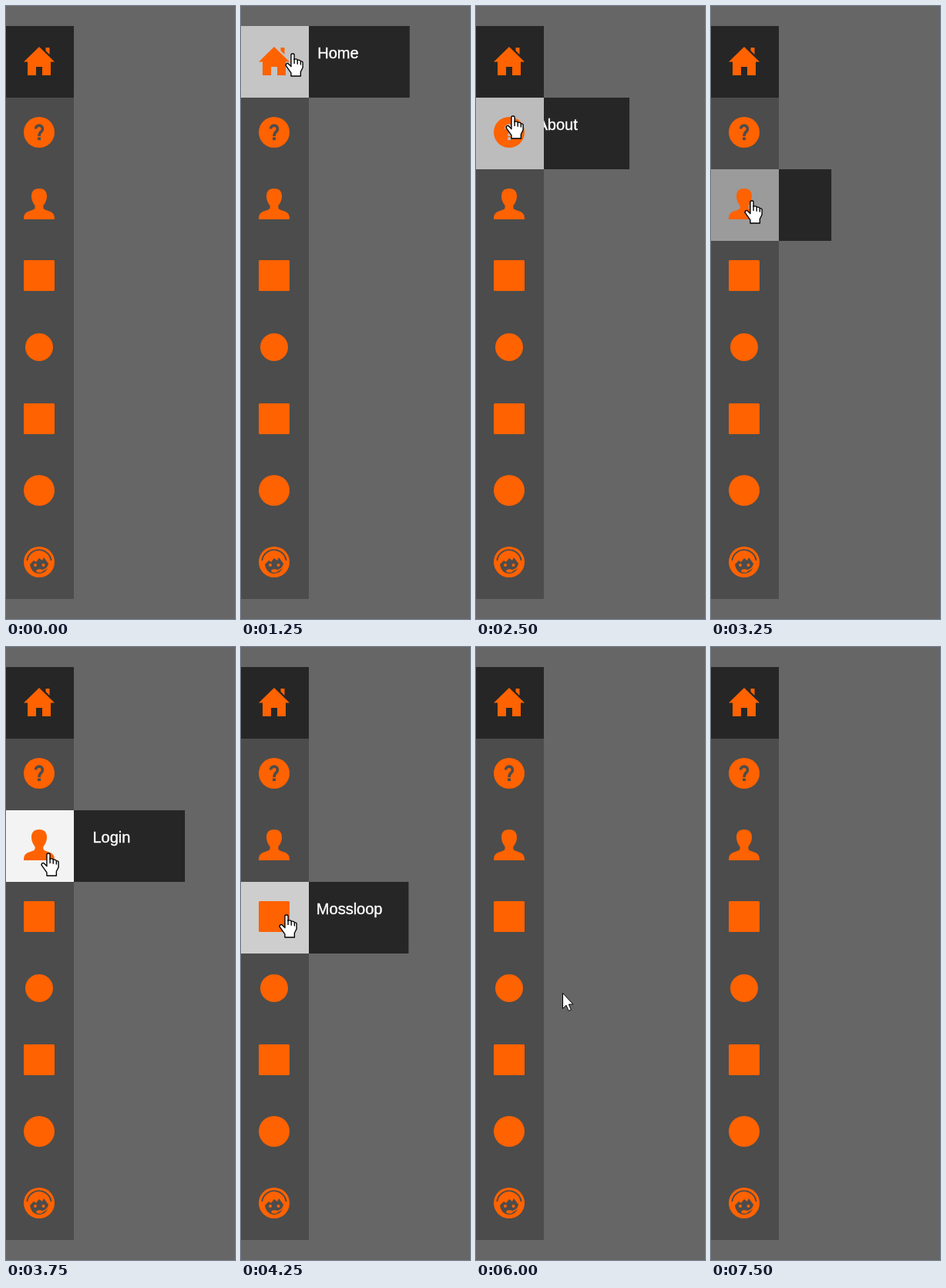
Animation, 297 px wide and 796 px high, one loop 8250 ms. Source, as an HTML page with a canvas:

```html
<!DOCTYPE html>
<html lang="en">
<head>
<meta charset="utf-8">
<title>Sliding side menu</title>
<style>
  html, body { margin: 0; width: 100%; height: 100%; overflow: hidden; background: #666; }
  canvas { display: block; }
</style>
</head>
<body>
<canvas id="stage" width="297" height="796"></canvas>
<script>
const ctx = document.getElementById('stage').getContext('2d');
const LOOP = 8250, STEP = 250;
const ORANGE = '#ff6200', DARK = '#262626';
const COLUMN = 88, PANEL = 144, ROW = 93, TOP = 26, SLIDE = 500, FADE = 240;

// Hovered rows: label, start and end of the hover in ms
const hovers = [
  { row: 0, label: 'Home', from: 932, to: 2250 },
  { row: 1, label: 'About', from: 2250, to: 3250, lead: -15 },
  { row: 2, label: 'Login', from: 3110, to: 4000 },
  { row: 3, label: 'Mossloop', from: 3940, to: 5000 },
  { row: 4, label: 'Murlite', from: 4790, to: 6000 }
];

// Pointer stops: time, x, y of the tip
const stops = [
  [750, 227, 79], [1000, 67, 62], [1500, 67, 55], [2000, 56, 73],
  [2250, 49, 135], [2500, 48, 143], [2750, 48, 150], [3000, 49, 211],
  [3250, 53, 253], [3750, 55, 268], [4000, 58, 325], [4250, 59, 348],
  [4750, 72, 403], [5000, 68.5, 448], [6000, 112, 449]
];

const shapes = {
  house: new Path2D('M20 2L40 21.500H35V39H24V28H16V39H5V21.500H0ZM28.500 3H33.500V12L28.500 7Z'),
  person: new Path2D('M20 0C27 0 30 4 30 10C30 16 27 20 25.5 22C25 26 26 27 29 28' +
    'C37 30.500 40 32 40 40H0C0 32 3 30.500 11 28C14 27 15 26 14.5 22C13 20 10 16 10 10C10 4 13 0 20 0Z'),
  face: new Path2D('M8 23L13 18L16 20L20 15L24 18L26 14L29 18L32 22C32 30 27 35 20 35S9 30 8 23Z'),
  hand: new Path2D('M5.500 13V1.500Q5.500 .5 6.500 .5H7.500Q8.500 .5 8.500 1.500V6Q8.500 5.500 10 5.500' +
    'Q11.500 5.500 11.500 6.500Q14 6 14.500 7.500Q16.500 7.500 16.500 9V13.500L14.500 17.500V21.500' +
    'H5.500V18.500L.5 11.500Q.5 9.500 2.500 9.500L5.500 12.500'),
  knuckles: new Path2D('M8.500 5V10M11.500 6.500V10.500M14.500 7.500V11'),
  arrow: new Path2D('M.5 .5V20.500L5 16.200L8.200 23.500L11.400 22L8.300 15H14Z')
};

// CSS "ease" timing, cubic-bezier(.25, .1, .25, 1)
function ease(p) {
  if (p <= 0) return 0;
  if (p >= 1) return 1;
  const curve = (u, a, b) => 3 * u * (1 - u) ** 2 * a + 3 * u * u * (1 - u) * b + u ** 3;
  let lo = 0, hi = 1;
  for (let i = 0; i < 24; i++) {
    const mid = (lo + hi) / 2;
    if (curve(mid, 0.25, 0.25) < p) lo = mid; else hi = mid;
  }
  return curve(lo, 0.1, 1);
}

function rect(x, y, w, h, color) {
  ctx.fillStyle = color;
  ctx.fillRect(x, y, w, h);
}

function disc(x, y, rx, color, ry = rx) {
  ctx.fillStyle = color;
  ctx.beginPath();
  ctx.ellipse(x, y, rx, ry, 0, 0, Math.PI * 2);
  ctx.fill();
}

function arc(x, y, r, from, to, width, color) {
  ctx.strokeStyle = color;
  ctx.lineWidth = width;
  ctx.beginPath();
  ctx.arc(x, y, r, from * Math.PI, to * Math.PI);
  ctx.stroke();
}

function fillShape(path, color = ORANGE) {
  ctx.fillStyle = color;
  ctx.fill(path);
}

function square() {
  ctx.fillStyle = ORANGE;
  ctx.beginPath();
  ctx.roundRect(0, 0, 40, 40, 1.5);
  ctx.fill();
}

function help(back) {
  disc(20, 20, 20, ORANGE);
  ctx.strokeStyle = back;
  ctx.lineWidth = 3.6;
  ctx.beginPath();
  ctx.arc(20, 15.5, 4.4, Math.PI, Math.PI * 2.2);
  ctx.quadraticCurveTo(20, 21, 20, 25);
  ctx.stroke();
  rect(18, 26.5, 4, 3.6, back);
}

function support(back) {
  disc(20, 20, 20, ORANGE);
  arc(20, 20, 15.8, 1.04, 1.96, 1.8, back);
  fillShape(shapes.face, back);
  disc(15, 24, 2, ORANGE);
  disc(25.5, 24, 2, ORANGE);
  disc(20.5, 31.5, 4.2, ORANGE, 2.2);
  arc(21, 19, 12.5, 0.1, 0.45, 1.6, ORANGE);
}

const icons = [
  () => fillShape(shapes.house),
  help,
  () => fillShape(shapes.person),
  square,
  () => disc(20, 20, 18, ORANGE),
  square,
  () => disc(20, 20, 20, ORANGE),
  support
];

function drawPanel(hover, age) {
  const y = TOP + hover.row * ROW;
  const x = COLUMN - PANEL * (1 - ease(age / SLIDE));
  rect(x, y, PANEL, ROW, DARK);
  ctx.font = '20px "Liberation Sans", Arial, sans-serif';
  ctx.fillStyle = ctx.strokeStyle = '#fff';
  ctx.lineWidth = 0.4;
  ctx.fillText(hover.label, x + 24.5, y + 42);
  ctx.strokeText(hover.label, x + 24.5, y + 42);
}

function drawRow(row, age) {
  const y = TOP + row * ROW;
  const base = row ? 76 : 38;
  const glow = age === null ? 0 : 1 - Math.exp(-age / FADE);
  const level = Math.round(base + (255 - base) * glow);
  const back = `rgb(${level},${level},${level})`;
  rect(0, y, COLUMN, ROW, back);
  ctx.save();
  ctx.translate(23, y + 25);
  icons[row](back);
  ctx.restore();
}

function drawPointer(t) {
  if (t < 750 || t >= 6250) return;
  const [, x, y] = stops.filter(stop => stop[0] <= t).pop();
  const isHand = x < COLUMN;
  const path = isHand ? shapes.hand : shapes.arrow;
  ctx.save();
  ctx.translate(x, y);
  if (isHand) {
    ctx.scale(1.38, 1.38);
    ctx.translate(-7, -0.5);
  }
  ctx.lineJoin = 'round';
  ctx.lineWidth = 1;
  ctx.strokeStyle = '#000';
  ctx.fillStyle = '#fff';
  ctx.fill(path);
  ctx.stroke(path);
  if (isHand) ctx.stroke(shapes.knuckles);
  ctx.restore();
}

function draw(now) {
  // The screen refreshes in quarter-second steps
  const t = Math.floor((now % LOOP) / STEP) * STEP;
  rect(0, 0, 297, 796, '#666');
  // The latest hover wins and the previous one ends at once
  const hover = hovers.filter(h => t >= h.from && t < h.to).pop();
  const age = hover ? Math.max(0, t - hover.from + (hover.lead || 0)) : null;
  if (hover) drawPanel(hover, age);
  icons.forEach((_, row) => drawRow(row, hover && hover.row === row ? age : null));
  drawPointer(t);
}

const start = performance.now();
function tick() {
  draw(performance.now() - start);
  requestAnimationFrame(tick);
}
tick();
</script>
</body>
</html>
```
